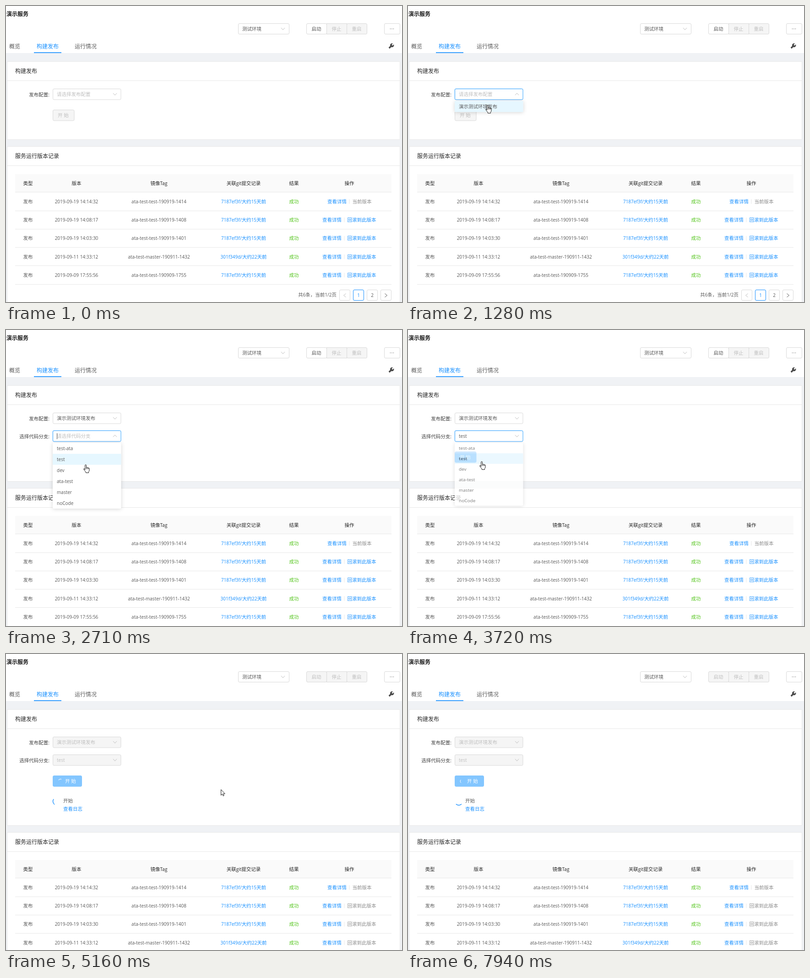
These frames come from a looping animation (865 px wide and 648 px high, 8 s). An HTML page:

```html
<!DOCTYPE html>
<html lang="zh-CN">
<head>
<meta charset="utf-8">
<title>构建发布</title>
<style>
html, body { margin: 0; width: 100%; height: 100%; overflow: hidden; background: #fff; }
svg { display: block; width: 865px; height: 648px; }
text { font-family: "Open Sans", "Noto Sans CJK SC", "Noto Sans CJK", sans-serif; }
tspan { font-size: .955em; }
.busy .start rect { fill: #f5f5f5; }
.busy .start text { fill: #bfbfbf; }
.busy .rollback { fill: #8c8c8c; }
.menu { filter: drop-shadow(0 1.5px 4px rgba(0, 0, 0, .16)); }
</style>
</head>
<body>
<svg id="stage" viewBox="0 0 865 648">
  <g id="page"></g>
  <g id="list"></g>
  <g id="form"></g>
  <g id="mouse" stroke="#000" stroke-width=".9" fill="#fff" stroke-linejoin="round">
    <path id="hand" d="M-1.3 12V1.7Q0 0 1.4 1.7V7Q2.8 5.8 3.8 7.3Q5.2 6.4 6.1 8Q8 7.5 8 9.6V13Q7.6 15.5 6.4 16.6V18.6H.4V17Q-2 14 -4.3 11Q-4.6 8.8 -2.6 10ZM1.4 7V10.5M3.8 7.5V10.5M6.1 8.3V10.5"/>
    <path id="arrow" d="M0 0V12.4L2.8 9.8L4.7 14L6.6 13.1L4.8 9.1H8.7Z"/>
  </g>
</svg>
<script>
const $ = id => document.getElementById(id);
const INK = '#262626', TEXT = '#595959', PALE = '#bfbfbf', BLUE = '#1890ff', HOVER = '#40a9ff',
      GREEN = '#52c41a', LINE = '#e8e8e8', EDGE = '#d9d9d9', OFF = '#f5f5f5';

// Text is placed by its visual middle; Latin runs are set slightly smaller.
const text = (x, y, s, fill = TEXT, { size = 10.5, anchor = 'start', weight = 400, cls = '' } = {}) =>
  `<text class="${cls}" x="${x}" y="${y + size * .36}" font-size="${size}" font-weight="${weight}" fill="${fill}" text-anchor="${anchor}">` +
  s.replace(/[\w\-\/:]+/g, '<tspan>$&</tspan>') + '</text>';
const mid = (x, y, s, fill, o) => text(x, y, s, fill, { ...o, anchor: 'middle' });
const box = (x, y, w, h, fill = '#fff', stroke = EDGE, r = 2.5) =>
  `<rect x="${x + .5}" y="${y + .5}" width="${w}" height="${h}" rx="${r}" fill="${fill}" stroke="${stroke}"/>`;
const fill = (x, y, w, h, color) => `<rect x="${x}" y="${y}" width="${w}" height="${h}" fill="${color}"/>`;
const stroke = (x, y, d, color, w = 1, turn = 0) =>
  `<path d="${d}" transform="translate(${x} ${y}) rotate(${turn})" fill="none" stroke="${color}" stroke-width="${w}"/>`;
const chevron = (x, y, up) => stroke(x, y, 'M-4 -2.2L0 2.2L4 -2.2', PALE, 1, up ? 180 : 0);
const card = (y, h, title) => box(2, y, 858, h, '#fff', LINE, 1.5) + fill(2, y + 42, 858, 1, LINE) +
  text(20, y + 22, title, INK, { size: 12 });

function buildPage() {
  const tab = (x, s, c = TEXT) => text(x, 89, s, c, { size: 12 });
  $('page').innerHTML = fill(0, 0, 865, 648, '#fff') + fill(0, 103, 865, 545, '#f0f2f5') +
    text(1, 18, '演示服务', '#1a1a1a', { size: 12, weight: 700 }) +
    box(507, 38, 111, 23) + text(516, 50, '测试环境') + chevron(605, 50) +
    box(700, 38, 44, 23, OFF, EDGE, 0) + mid(722, 50, '停止', PALE) +
    box(744, 38, 44, 23, OFF) + mid(766, 50, '重启', PALE) +
    `<g class="start">${box(656, 38, 44, 23)}${mid(678, 50, '启动')}</g>` +
    box(826, 38, 34, 23) + [839.5, 843, 846.5].map(x => fill(x - .6, 49.4, 1.2, 1.2, TEXT)).join('') +
    tab(7, '概览') + tab(67, '构建发布', BLUE) + tab(150, '运行情况') + fill(61, 101.3, 60, 1.7, BLUE) +
    stroke(0, 0, 'M836.8 92.2L842 87', '#4a4a4a', 3.4) +
    '<circle cx="843.2" cy="86" r="4.3" fill="#4a4a4a"/>' +
    stroke(0, 0, 'M843.4 85.8L848.5 80.7', '#fff', 2.8);
}

function buildList() {
  const cols = [48, 154, 334, 519, 629, 750];
  const heads = ['类型', '版本', '镜像Tag', '关联git提交记录', '结果', '操作'];
  const rows = [
    ['2019-09-19 14:14:32', 'test-190919-1414'],
    ['2019-09-19 14:08:17', 'test-190919-1408'],
    ['2019-09-19 14:03:30', 'test-190919-1401'],
    ['2019-09-11 14:33:12', 'master-190911-1432', '301f349d/大约22天前'],
    ['2019-09-09 17:55:56', 'test-190909-1755']
  ];
  let s = card(307, 400, '服务运行版本记录') + fill(20, 368, 822, 39, '#fafafa') + fill(20, 407, 822, 1, LINE);
  heads.forEach((h, i) => s += mid(cols[i], 388, h, INK, { weight: 500 }));
  rows.forEach(([date, tag, commit = '7187ef3f/大约15天前'], i) => {
    const y = 428 + 40.25 * i;
    const cells = ['发布', date, 'ata-test-' + tag, commit, '成功'];
    const colors = [TEXT, TEXT, TEXT, BLUE, GREEN];
    cells.forEach((c, k) => s += mid(cols[k], y, c, colors[k]));
    const x = i ? 691 : 702;
    s += text(x, y, '查看详情', BLUE) + fill(x + 47.5, y - 5, 1, 10, LINE) +
      (i ? text(x + 54.5, y, '回滚到此版本', BLUE, { cls: 'rollback' }) : text(x + 54.5, y, '当前版本', '#8c8c8c')) +
      fill(20, Math.round(y + 19.6), 822, 1, LINE);
  });
  s += text(722, 632, '共6条，当前1/2页', TEXT, { anchor: 'end' });
  [728, 758, 788, 818].forEach((x, i) => s += box(x, 621, 23, 23, '#fff', i == 1 ? BLUE : EDGE));
  s += stroke(740, 633.5, 'M2.5 -4L-2.5 0L2.5 4', PALE) + mid(770, 633, '1', BLUE) +
    mid(800, 633, '2') + stroke(830, 633.5, 'M-2.5 -4L2.5 0L-2.5 4', TEXT);
  $('list').innerHTML = s;
}

// Moments of the session, in ms
const OPEN1 = 970, PICK1 = 1530, OPEN2 = 2370, PICK2 = 3566, START = 4330, RUN = 4900;
const path = [
  [70, 780, 640], [800, 174, 196], [970, 174, 196], [1280, 174, 216], [1600, 174, 216],
  [2300, 172, 228], [2400, 172, 228], [2710, 174, 294], [2850, 167, 303], [3200, 167, 303],
  [3250, 161, 287], [3800, 161, 287], [4100, 137, 272], [4900, 137, 272], [5230, 512, 300]
];
const clamp = v => Math.max(0, Math.min(1, v));
const smooth = p => p * p * (3 - 2 * p);

function select(y, label, value, hint, { hover, focus, open, off }) {
  const ring = focus ? `<rect x="101.2" y="${y - .8}" width="150.6" height="25.6" rx="3.5" fill="${BLUE}" opacity=".2"/>` : '';
  return text(95, y + 13, label, '#404040', { anchor: 'end' }) + ring +
    box(102, y, 148.5, 23.5, off ? OFF : '#fff', hover || focus ? HOVER : EDGE) +
    text(111, y + 12, value || hint, value && !off ? TEXT : PALE) + chevron(238, y + 12, open);
}

function menu(t, y, items, open, pick, active) {
  if (t < open || t > pick + 200) return '';
  const shown = t < pick ? 1 - (1 - clamp((t - open) / 200)) ** 5 : 1 - ((t - pick) / 200) ** 6;
  return `<g class="menu" opacity="${shown}" transform="translate(0 ${y}) scale(1 ${.8 + .2 * shown})">` +
    `<rect x="102" width="149.5" height="${24 * items.length}" rx="2.5" fill="#fff"/>` +
    fill(102, 24 * active, 149.5, 24, '#e6f7ff') +
    items.map((s, i) => text(111, 24 * i + 12, s, TEXT, { weight: t >= pick && i == active ? 600 : 400 })).join('') + '</g>';
}

const spinner = (x, y, r, color, w, turn) => stroke(x, y, `M0 ${-r}A${r} ${r} 0 0 1 ${r} 0`, color, w, turn);

function startButton(t, y) {
  const label = (x, c) => text(x, y + 12.5, '开 始', c);
  if (t < PICK2) return box(102, y, 46.5, 23.5, OFF) + label(113, PALE);
  if (t < START) {
    const c = t > 4000 ? HOVER : BLUE;
    return box(102, y, 46.5, 23.5, c, c) + label(113, '#fff');
  }
  const p = smooth(clamp((t - START) / 280)), w = 46.5 + 16.5 * p;
  const ring = t < 4750 ? `<rect x="100.5" y="${y - 1.5}" width="${w + 4}" height="27.5" rx="4" fill="${BLUE}" opacity=".2"/>` : '';
  return ring + box(102, y, w, 23.5, '#83c6ff', '#83c6ff') +
    spinner(113.9 + 5 * p, y + 12.5, 4.7, '#fff', .9, (t - 6330) * .36) + label(113 + 16 * p, '#fff');
}

function drawForm(t) {
  const picked = t >= PICK1, run = t >= RUN;
  const shift = run ? 83 : picked ? 39 : 0;
  $('list').setAttribute('transform', `translate(0 ${shift})`);
  $('stage').classList.toggle('busy', t >= START);

  let s = card(121, 171 + shift, '构建发布') + select(181, '发布配置:', picked && '演示测试环境发布', '请选择发布配置', {
    hover: t > 760 && t < OPEN1, focus: t >= OPEN1 && t < OPEN2, open: t >= OPEN1 && t < PICK1, off: run
  });
  if (picked) s += select(220, '选择代码分支:', t >= PICK2 && 'test', '请选择代码分支', {
    hover: t > 2200 && t < OPEN2, focus: t >= OPEN2 && t < START, open: t >= OPEN2 && t < PICK2, off: run
  });
  if (t >= OPEN2 && t < PICK2) s += fill(111, 226, 1, 13, TEXT);
  s += startButton(t, picked ? 266 : 227);
  if (run) s += spinner(111, 322.5, 8.5, BLUE, 1.4, (t - 6380) * .36 - 66) +
    text(125, 321, '开始') + text(125, 339, '查看日志', BLUE);

  const active = t < 2600 ? 0 : t > 2800 && t < 3400 ? 2 : 1;
  s += menu(t, 208, ['演示测试环境发布'], OPEN1, PICK1, 0) +
    menu(t, 247, ['test-ata', 'test', 'dev', 'ata-test', 'master', 'noCode'], OPEN2, PICK2, active);
  $('form').innerHTML = s;
}

function drawMouse(t) {
  const i = path.findIndex(k => k[0] > t);
  const show = i > 0;
  $('mouse').style.display = show ? '' : 'none';
  if (!show) return;
  const [t0, x0, y0] = path[i - 1], [t1, x1, y1] = path[i];
  const p = smooth((t - t0) / (t1 - t0));
  $('mouse').setAttribute('transform', `translate(${x0 + (x1 - x0) * p} ${y0 + (y1 - y0) * p})`);
  const hand = t > 760 && t < START;
  $('hand').style.display = hand ? '' : 'none';
  $('arrow').style.display = hand ? 'none' : '';
}

function frame() {
  const t = performance.now() % 8000;
  drawForm(t);
  drawMouse(t);
  requestAnimationFrame(frame);
}

buildPage();
buildList();
frame();
</script>
</body>
</html>
```
